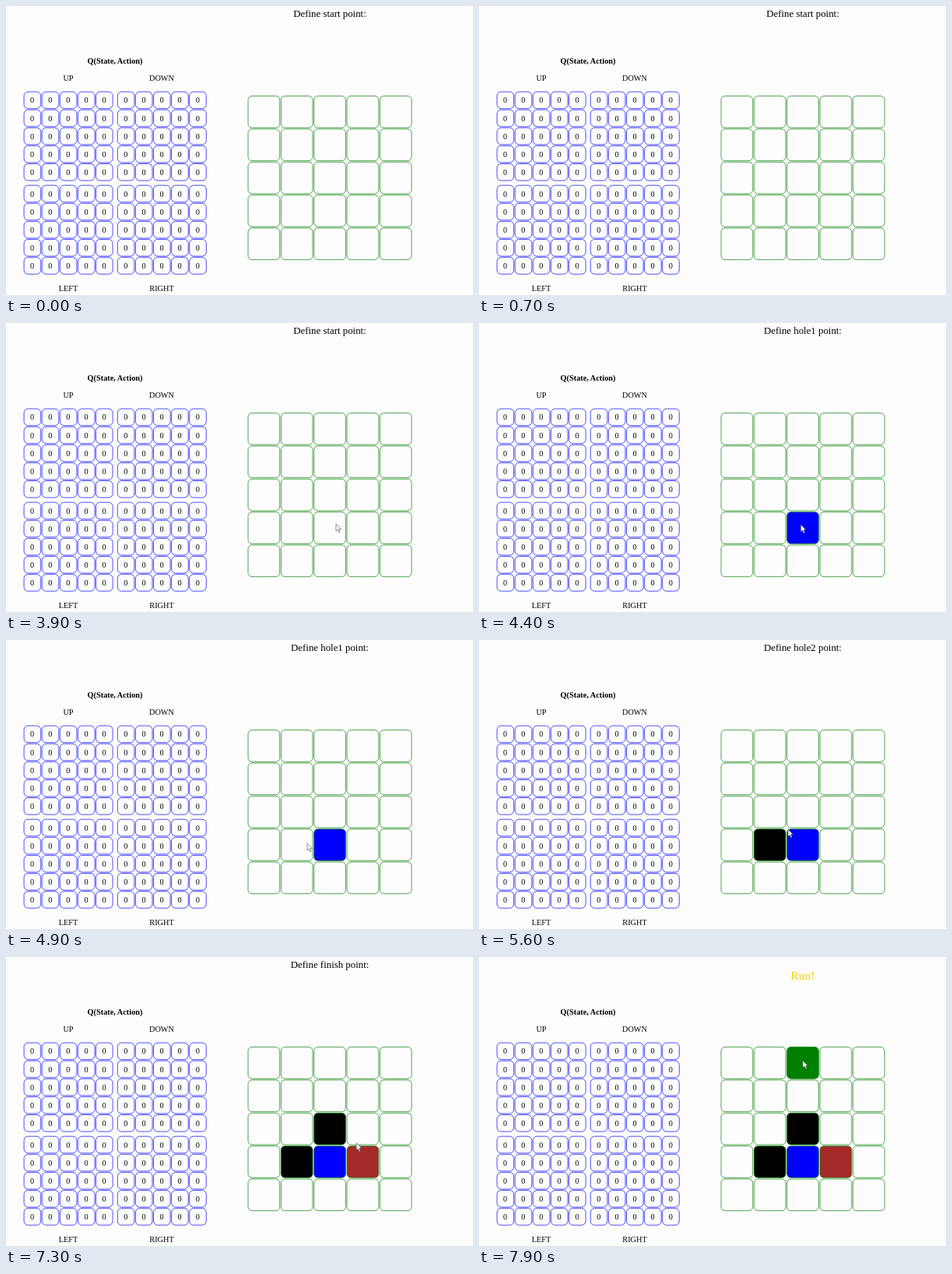
An HTML page for the animation above (8 s loop, 600 px wide and 371 px high).

```html
<!DOCTYPE html>
<html lang="en">
<head>
<meta charset="utf-8">
<title>Q-learning grid setup</title>
<style>
  html, body { margin: 0; width: 100%; height: 100%; overflow: hidden; background: #fdfdfd; }
  svg { display: block; width: 600px; height: 371px; }
  text { font: 10.3px "Liberation Serif", "Times New Roman", serif; text-anchor: middle; fill: #000; }
  .title { font-weight: bold; }
  #prompt { font-size: 12.85px; }
  #prompt.run { font-size: 15.4px; fill: #f5d000; }
  .q { fill: none; stroke: #00f; stroke-width: .7; }
  .cell { fill: none; stroke: #008000; stroke-width: .7; }
  #cursor { fill: #fff; stroke: #444; stroke-width: .6; stroke-linejoin: round; }
</style>
</head>
<body>
<svg id="stage" viewBox="0 0 600 371">
  <text id="prompt" x="416" y="14"></text>
  <text class="title" x="140" y="73.5">Q(State, Action)</text>
  <text x="80" y="95.7">UP</text>
  <text x="200" y="95.7">DOWN</text>
  <text x="80" y="365.5">LEFT</text>
  <text x="200" y="365.5">RIGHT</text>
  <g id="tables"></g>
  <g id="maze"></g>
  <path id="cursor" d="M0 0V9.2L2.1 7.3 3.6 10.8 5.1 10.1 3.6 6.7H6.5Z"/>
</svg>
<script>
const LOOP = 8000, STEP = 100, SIZE = 5;
const byId = id => document.getElementById(id);

function add(parent, tag, attrs, text = '') {
  const el = document.createElementNS('http://www.w3.org/2000/svg', tag);
  for (const k in attrs) el.setAttribute(k, attrs[k]);
  el.textContent = text;
  return parent.appendChild(el);
}

function eachCell(fn) {
  for (let row = 0; row < SIZE; row++)
    for (let col = 0; col < SIZE; col++) fn(row, col);
}

for (const left of [23.1, 143.3])
  for (const top of [110.1, 230.2])
    eachCell((row, col) => {
      const x = left + col * 23.1, y = top + row * 23.1;
      add(byId('tables'), 'rect', { class: 'q', x, y, width: 21.6, height: 21.6, rx: 5.2 });
      add(byId('tables'), 'text', { x: x + 10.6, y: y + 14.3 }, '0');
    });

const cells = [];
eachCell((row, col) => cells.push(add(byId('maze'), 'rect', {
  class: 'cell', x: 311 + col * 42.35, y: 115.6 + row * 42.35, width: 40.7, height: 40.7, rx: 5
})));

// Each click colours one cell and brings up the next prompt.
const clicks = [
  { at: 4200, row: 3, col: 2, fill: '#00f', next: 'Define hole1 point:' },
  { at: 5200, row: 3, col: 1, fill: '#000', next: 'Define hole2 point:' },
  { at: 6300, row: 2, col: 2, fill: '#000', next: 'Define wall point:' },
  { at: 7200, row: 3, col: 3, fill: '#a52a2a', next: 'Define finish point:' },
  { at: 7900, row: 0, col: 2, fill: '#008000', next: 'Run!' }
];

// Cursor path: time, x, y
const path = [
  [3400, 470, 90], [3900, 424, 258], [4200, 424, 258], [4900, 387, 261],
  [5100, 376, 262], [5200, 376, 262], [5600, 397, 243], [5900, 414, 223],
  [6300, 414, 223], [6700, 439, 245], [7100, 457, 260], [7200, 457, 260],
  [7800, 416, 133], [LOOP, 416, 133]
];

function moveCursor(t) {
  const i = path.findIndex(p => p[0] > t);
  const cursor = byId('cursor');
  cursor.style.display = i > 0 ? '' : 'none';
  if (i < 1) return;
  const [t0, x0, y0] = path[i - 1], [t1, x1, y1] = path[i];
  const k = (t - t0) / (t1 - t0);
  cursor.setAttribute('transform', `translate(${x0 + (x1 - x0) * k} ${y0 + (y1 - y0) * k})`);
}

function draw(t) {
  let message = 'Define start point:';
  for (const c of clicks) {
    const done = t >= c.at;
    cells[c.row * SIZE + c.col].style.fill = done ? c.fill : 'none';
    if (done) message = c.next;
  }
  const run = message === 'Run!', prompt = byId('prompt');
  prompt.textContent = message;
  prompt.setAttribute('class', run ? 'run' : '');
  prompt.setAttribute('y', run ? 28.8 : 14);
  moveCursor(t);
}

const start = performance.now();
function tick() {
  const t = (performance.now() - start) % LOOP;
  draw(Math.floor(t / STEP) * STEP);
  requestAnimationFrame(tick);
}
tick();
</script>
</body>
</html>
```
